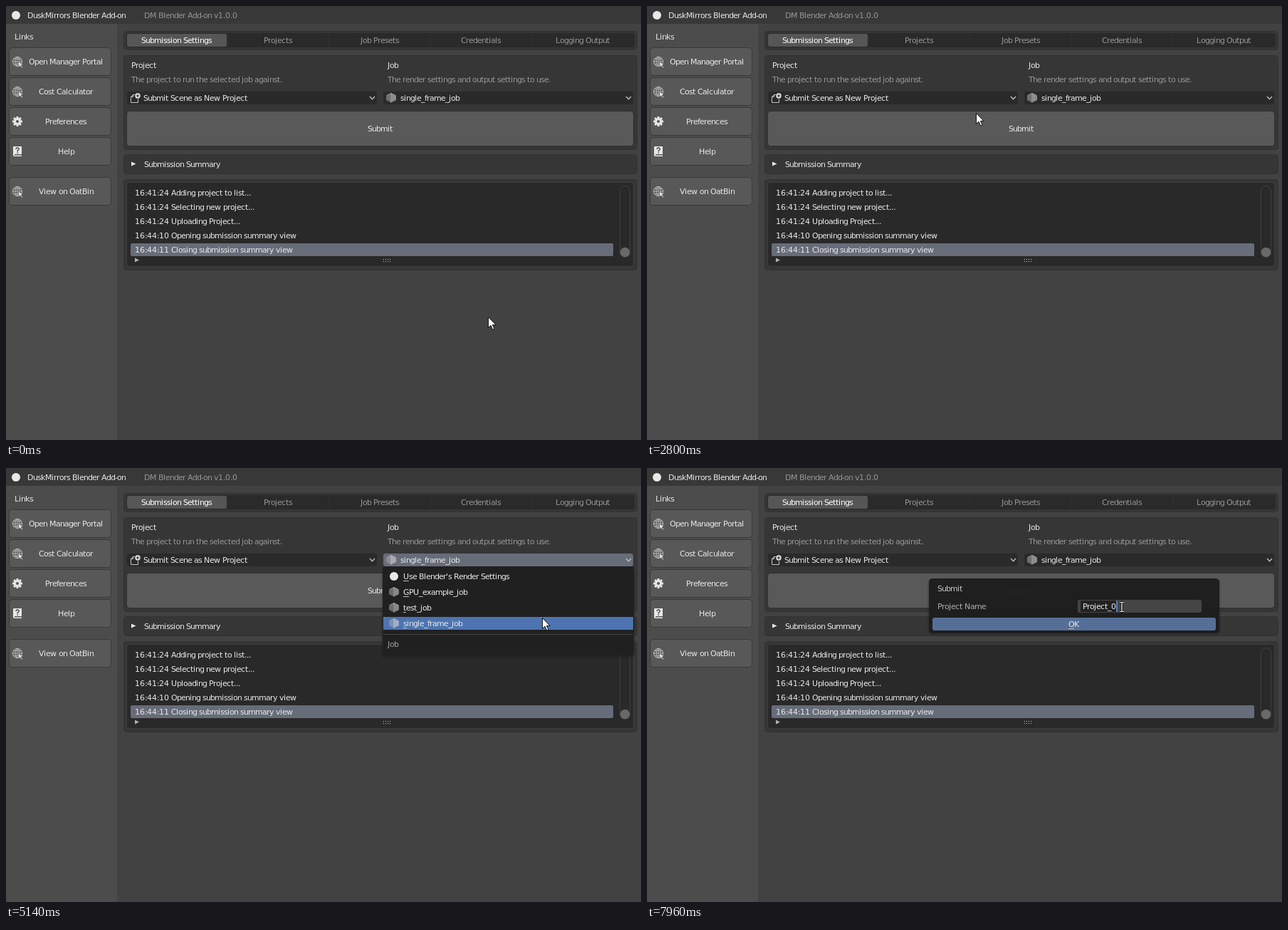
An HTML page for the animation above (8000 ms loop, 892 by 609 pixels).

```html
<!DOCTYPE html>
<html lang="en">
<head>
<meta charset="utf-8">
<title>Add-on submission</title>
<style>
  html, body { margin: 0; width: 100%; height: 100%; overflow: hidden; background: #424242; }
  svg { display: block; }
  text { font: 11px "DejaVu Sans", sans-serif; }
</style>
</head>
<body>
<svg width="892" height="609" viewBox="0 0 892 609"></svg>
<script>
const NS = "http://www.w3.org/2000/svg";
const root = document.querySelector("svg");
const meter = document.createElement("canvas").getContext("2d");
meter.font = '1100px "DejaVu Sans", sans-serif';

const WHITE = "#e8e8e8", GREY = "#969696", FIELD = "#2a2a2a", ACTIVE = "#676c79";

function el(tag, attrs, parent = root) {
  const node = document.createElementNS(NS, tag);
  for (const key in attrs) node.setAttribute(key, attrs[key]);
  parent.appendChild(node);
  return node;
}

const group = (x = 0, y = 0, parent = root) =>
  el("g", { transform: `translate(${x} ${y})` }, parent);

function box(x, y, width, height, rx, fill, parent = root, stroke = "none") {
  const inset = stroke === "none" ? 0 : 0.5;
  return el("rect", {
    x: x + inset, y: y + inset, width: width - 2 * inset, height: height - 2 * inset,
    rx, fill, stroke
  }, parent);
}

const line = (d, parent, stroke = "#d0d0d0", width = 1) =>
  el("path", { d, fill: "none", stroke, "stroke-width": width }, parent);

const shape = (d, parent, fill = WHITE) => el("path", { d, fill }, parent);

// Glyph advances are cut down to whole pixels, as in the interface toolkit.
const advance = c => Math.floor(Math.round(meter.measureText(c).width * 0.64) / 64);

function label(str, x, midY, fill = WHITE, parent = root, centered = false) {
  const steps = [...str].map(advance);
  let pen = centered ? Math.floor(x - steps.reduce((a, b) => a + b, 0) / 2) : x;
  const xs = steps.map(step => (pen += step) - step);
  const node = el("text", { x: xs.join(" "), y: midY + 4, fill }, parent);
  node.textContent = str;
  return xs[0];
}

function keyLabel(str, x, midY, parent, centered) {
  const left = label(str, x, midY, WHITE, parent, centered);
  box(left, midY + 6, advance(str[0]), 1, 0, "#bdbdbd", parent);
}

// Icons
function globe(x, y) {
  const g = group(x, y);
  el("circle", { r: 6.5, fill: "none", stroke: "#c4c4c4" }, g);
  el("ellipse", { rx: 3, ry: 6.5, fill: "none", stroke: "#c4c4c4", "stroke-width": 0.9 }, g);
  line("M0 -6.5V6.5M-6.5 0H6.5M-5.5 -3.5H5.5M-5.5 3.5H5.5", g, "#c4c4c4", 0.8);
  el("path", { d: "M1 0L8 4L5 5L7.5 8L6.5 9L4 6L2.5 8Z", fill: WHITE, stroke: "#585858", "stroke-width": 0.7 }, g);
}

function gear(x, y) {
  const g = group(x, y);
  for (let a = 0; a < 360; a += 45)
    el("rect", { x: -1.5, y: -7, width: 3, height: 4, fill: WHITE, transform: `rotate(${a})` }, g);
  el("circle", { r: 3.6, fill: "none", stroke: WHITE, "stroke-width": 3 }, g);
}

function book(x, y) {
  const g = group(x, y);
  shape("M-5 -7H6V4H-4V5.5H6V7H-4Q-6 7 -6 5V-6Q-6 -7 -5 -7Z", g);
  line("M-2 -3Q-2 -5 0 -5Q2.2 -5 2.2 -3.2Q2.2 -2 0.2 -1V0.5M0.2 1.5V3", g, "#4a4a4a", 1.4);
}

function newPage(x, y, parent = root) {
  const g = group(x, y, parent);
  line("M0 -4.5H-2.5L-5.5 -1.5V6.5H4.5V1.5M-5.5 -1.5H-2.5V-4.5", g, "#c8c8c8");
  el("circle", { cx: 4, cy: -3, r: 3.7, fill: WHITE }, g);
  line("M4 -5.3V-0.7M1.7 -3H6.3", g, "#2a2a2a", 1.2);
}

function barCube(x, y, parent = root) {
  const g = group(x, y, parent);
  for (let i = -3; i <= 3; i++) {
    const cx = i * 2, slope = Math.abs(cx) * 0.5;
    line(`M${cx} ${slope - 6.5}V${6.5 - slope}`, g, i < 0 ? "#a8a8a8" : "#dedede", 1.1);
  }
  line("M-6 -3.5L0 -6.5L6 -3.5", g, "#b8b8b8", 0.8);
}

const chevron = (x, y, parent) => line(`M${x - 3.5} ${y - 2}L${x} ${y + 1.8}L${x + 3.5} ${y - 2}`, parent, "#c0c0c0", 1.3);

// Page, header and sidebar
box(0, 0, 892, 609, 0, "#424242");
box(0, 25, 156, 584, 0, "#4c4c4c");
box(0, 0, 892, 25, 0, "#383838");
el("circle", { cx: 14, cy: 13, r: 6, fill: WHITE });
label("DuskMirrors Blender Add-on", 30, 13);
label("DM Blender Add-on v1.0.0", 194, 13, GREY);
label("Links", 12, 43);

[["Open Manager Portal", 59, globe], ["Cost Calculator", 101, globe], ["Preferences", 143, gear],
 ["Help", 185, book], ["View on OatBin", 241, globe]].forEach(([name, y, icon]) => {
  box(4, y - 1, 144, 40, 4, "#585858", root, "#393939");
  icon(16, y + 19);
  label(name, 84.5, y + 19, WHITE, root, true);
});

// Panels
[[35, 27], [69, 133], [208, 28], [243, 128]].forEach(([y, h]) => box(165, y, 722, h, 4, "#363636", root, "#323232"));

box(169, 38, 714, 20, 4, "#2a2a2a");
["Submission Settings", "Projects", "Job Presets", "Credentials", "Logging Output"].forEach((name, i) => {
  const x = 169 + i * 142.6;
  if (i) box(Math.round(x) - 1, 39, 1, 18, 0, "#303030");
  else box(170, 39, 140, 18, 3, "#565656");
  label(name, x + 71, 48, i ? GREY : "#ffffff", root, true);
});

label("Project", 176, 83);
label("The project to run the selected job against.", 176, 103, GREY);
label("Job", 536, 83);
label("The render settings and output settings to use.", 536, 103, GREY);

const submit = box(169, 147, 713, 50, 4, "#595959", root, "#303030");
label("Submit", 525.5, 172, WHITE, root, true);

shape("M176 218.5L182.5 221.5L176 224.5Z");
label("Submission Summary", 194, 222);

box(169, 247, 713, 119, 4, "#292929", root, "#3e3e3e");
box(175, 333, 678, 18, 2, ACTIVE);
["16:41:24 Adding project to list...", "16:41:24 Selecting new project...", "16:41:24 Uploading Project...",
 "16:44:10 Opening submission summary view", "16:44:11 Closing submission summary view"]
  .forEach((row, i) => label(row, 181, 262 + i * 20));
shape("M181 353.5L187 356.5L181 359.5Z", root, "#b0b0b0");
for (let i = 0; i < 8; i++) box(530 + (i >> 1) * 3, 355 + (i & 1) * 3, 1, 1, 0, "#d0d0d0");
box(862, 252, 15, 101, 7, "#292929", root, "#404040");
el("circle", { cx: 869.5, cy: 345.5, r: 6.8, fill: "#696969" });

// Drop-down fields and their menus
function field(x, icon, name, textX) {
  const rect = box(x, 120, 351, 18, 3, FIELD);
  icon(x + 11, 129);
  label(name, textX, 129);
  chevron(x + 344.5, 129);
  return rect;
}
const projectField = field(170, newPage, "Submit Scene as New Project", 193);
const jobField = field(530, barCube, "single_frame_job", 554);

function menu(x, items, title) {
  const g = group();
  const end = 167 + (items.length - 1) * 22;
  box(x - 3, 141, 357, end - 107, 5, "rgba(0,0,0,.12)", g);
  box(x - 1, 138, 353, end - 108, 3, "#202020", g);
  const bars = items.map(([name, icon], i) => {
    const y = 152 + i * 22;
    const bar = box(x, y - 9, 351, 18, 0, "#4d74b0", g);
    icon(x + 15, y, g);
    keyLabel(name, x + 28, y, g);
    return bar;
  });
  box(x, end, 351, 1, 0, "#444444", g);
  label(title, x + 6, end + 14, "#a0a0a0", g);
  return { g, bars };
}
const whiteDot = (x, y, parent) => el("circle", { cx: x, cy: y, r: 6, fill: WHITE }, parent);
const projectMenu = menu(170, [["Submit Scene as New Project", newPage]], "Project");
const jobMenu = menu(530, [["Use Blender's Render Settings", whiteDot], ["GPU_example_job", barCube],
  ["test_job", barCube], ["single_frame_job", barCube]], "Job");

// Dialog
const dialog = group();
box(394, 155, 412, 80, 6, "rgba(0,0,0,.12)", dialog);
box(396, 155, 408, 77, 5, "rgba(30,30,30,.96)", dialog);
label("Submit", 408, 169, "#c4c4c4", dialog);
label("Project Name", 408, 194, "#acacac", dialog);
const nameField = box(605, 185, 174, 18, 3, "#545454", dialog);
const selection = group(0, 0, dialog);
box(609, 186, 50, 16, 0, "#222222", selection);
box(659, 186, 2, 16, 0, "#5680c2", selection);
label("Project_0", 612, 194, WHITE, dialog);
box(401, 210, 398, 18, 3, "#566f98", dialog);
keyLabel("OK", 600, 219, dialog, true);

// Pointer
const pointer = group();
const halo = el("circle", { r: 12, fill: "#d8cf4a", "fill-opacity": 0.75 }, pointer);
const arrow = el("path", {
  d: "M0.5 0.5V15.5L4 12.2L6.7 18L9 17L6.4 11.4H11Z",
  fill: "#ffffff", stroke: "#111111", "stroke-width": 1
}, pointer);
const beam = group(0, 0, pointer);
const beamPath = "M-3 -6.5H-1L0 -6L1 -6.5H3M0 -6V6M-3 6.5H-1L0 6L1 6.5H3";
line(beamPath, beam, "#111111", 3);
line(beamPath, beam, "#ffffff", 1.2);

// Pointer path: tick, x, y
const path = [
  [-1, 677, 436], [10, 466, 131], [12, 473, 131], [23, 473, 131], [28, 462, 150], [32, 462, 150],
  [40, 775, 131], [42, 799, 132], [52, 799, 132], [53, 796, 133], [62, 753, 210], [65, 752, 211],
  [69, 752, 211], [77, 600, 168], [85, 600, 168], [95, 667, 195]
];
const clicks = [[14, 15], [30, 31], [44, 46], [67, 68], [82, 84], [97, 98]];

function pointerAt(k) {
  if (k <= path[0][0]) return path[0].slice(1);
  for (let i = 1; i < path.length; i++) {
    const [k0, x0, y0] = path[i - 1], [k1, x1, y1] = path[i];
    if (k > k1) continue;
    const u = (k - k0) / (k1 - k0), e = u * u * (3 - 2 * u);
    return [Math.round(x0 + (x1 - x0) * e), Math.round(y0 + (y1 - y0) * e)];
  }
  return path[path.length - 1].slice(1);
}

const within = (k, a, b) => k >= a && k < b;
const show = (node, on) => node.setAttribute("display", on ? "inline" : "none");
const paint = (node, fill) => node.setAttribute("fill", fill);

function draw(ms) {
  const k = Math.floor((ms - 290) / 78.27 + 0.3);
  const [x, y] = pointerAt(k);
  const over = (l, t, r, b) => x >= l && x < r && y >= t && y < b;
  const projectOpen = within(k, 14, 31), jobOpen = within(k, 44, 68), dialogOpen = k >= 84;
  const free = !projectOpen && !jobOpen && !dialogOpen && !within(k, 31, 33);

  paint(projectField, projectOpen ? ACTIVE : free && over(170, 120, 521, 138) ? "#353535" : FIELD);
  paint(jobField, jobOpen ? ACTIVE : free && over(530, 120, 881, 138) ? "#353535" : FIELD);
  paint(submit, within(k, 82, 84) ? "#5680c2" : free && over(170, 148, 881, 196) ? "#676767" : "#595959");

  [[projectMenu, projectOpen], [jobMenu, jobOpen]].forEach(([m, open]) => {
    show(m.g, open);
    m.bars.forEach((bar, i) => show(bar, within(y, 141 + i * 22, 163 + i * 22)));
  });

  const overName = dialogOpen && over(605, 185, 779, 203);
  show(dialog, dialogOpen);
  show(selection, k >= 98);
  paint(nameField, k >= 98 ? "#454545" : overName ? "#606060" : "#545454");

  pointer.setAttribute("transform", `translate(${x} ${y})`);
  show(halo, clicks.some(([a, b]) => within(k, a, b)));
  show(arrow, !overName);
  show(beam, overName);
}

function frame() {
  draw(performance.now() % 8000);
  requestAnimationFrame(frame);
}
frame();
</script>
</body>
</html>
```
